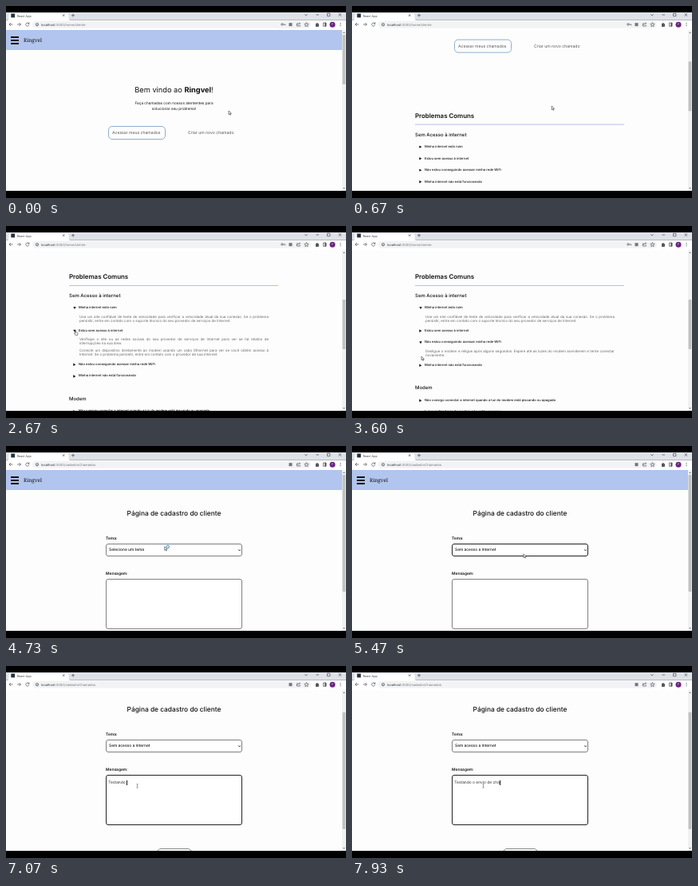
These frames come from a looping animation (426 by 240 pixels, 8000 ms). An HTML page:

```html
<!DOCTYPE html>
<html lang="pt-BR">
<head>
<meta charset="utf-8">
<title>React App</title>
<style>
html, body { margin: 0; width: 100%; height: 100%; overflow: hidden; background: #000; }
#stage { position: relative; width: 426px; height: 240px; overflow: hidden; background: #000;
  font-family: Inter, sans-serif; color: #111; text-rendering: geometricPrecision; white-space: nowrap; }
svg { position: absolute; left: 0; top: 0; width: 426px; height: 240px; }
svg text { dominant-baseline: central; font-size: 4.1px; }
.icon { fill: none; stroke: #55585d; stroke-width: .75; }
#view { position: absolute; top: 30px; width: 421px; height: 201px; overflow: hidden; background: #fdfdfd; }
.page { position: absolute; left: 0; top: -30px; width: 421px; height: 700px; }
.page > * { position: absolute; box-sizing: border-box; }
.bar { top: 30px; width: 421px; height: 25px; background: #b1c5ee; }
.bar i { position: absolute; left: 6px; width: 9.5px; height: 1.7px; background: #111; }
.bar b { position: absolute; left: 22px; top: 12.5px; font: 500 6.4px/0 "Noto Serif", serif; }
.line { line-height: 0; }
.mid { left: 210.5px; transform: translateX(-50%); }
.button { color: #555; font-size: 5.1px; }
.pill { left: 127.5px; top: 150px; width: 72px; height: 17px; border: .7px solid #8eb0cf; border-radius: 5px; }
.rule { left: 79px; top: 255.5px; width: 262px; height: .8px; background: #b9c0e4; }
#faq { left: 79px; top: 262.5px; width: 262px; }
#faq h3 { margin: 0; font-size: 6px; font-weight: 500; line-height: 14px; padding-bottom: .6px; }
.item + h3 { padding-top: 14.7px; }
.item > b { display: block; position: relative; padding-left: 12px; font-size: 4.12px; font-weight: 500; line-height: 14.6px; }
.item > b::before { content: ""; position: absolute; left: 5.3px; top: 5.6px; width: 3.4px; height: 3.6px;
  background: #111; clip-path: polygon(0 0, 90% 50%, 0 100%); }
.item.open > b::before { clip-path: polygon(0 10%, 100% 10%, 50% 95%); }
.body { display: none; margin-left: 13px; width: 237px; padding: 2px 0 1.7px; color: #666; font-size: 4.44px; line-height: 5.15px; }
.open .body { display: block; }
.body p { margin: 0; }
.body p + p { margin-top: 3.3px; }
.body p div:not(:last-child) { text-align-last: justify; }
.label { left: 125px; font-size: 4.9px; font-weight: 600; }
.field { left: 125px; width: 171px; border: .8px solid #808080; border-radius: 3px; background: #fff; }
.field.focus { border: 1.3px solid #222; }
#theme { top: 122px; height: 16px; }
#message { top: 166px; height: 63px; }
#themeText { left: 129px; top: 130px; font-size: 4.85px; font-weight: 500; }
#typed { left: 128.3px; top: 173px; font-size: 4.9px; color: #333; }
#typed.caret::after { content: ""; display: inline-block; width: .6px; height: 5.5px; vertical-align: -1.1px; background: #111; }
.chevron { left: 291px; top: 129px; width: 3.2px; height: 2.4px; background: #222;
  clip-path: polygon(0 0, 50% 60%, 100% 0, 100% 35%, 50% 100%, 0 35%); }
.send { left: 189px; top: 258px; width: 44px; height: 16px; border: .8px solid #888; border-radius: 5px; }
</style>
</head>
<body>
<div id="stage">
  <div id="view">
    <div class="page" id="home">
      <div class="bar"></div>
      <div class="line mid" style="top:106px;font-size:9.25px">Bem vindo ao <b>Ringvel</b>!</div>
      <div class="line mid" style="top:121.5px;font-size:4.67px">Faça chamadas com nossos atententes para</div>
      <div class="line mid" style="top:129px;font-size:4.67px">solucionar seu problema!</div>
      <div class="pill"></div>
      <div class="line button" style="left:133px;top:158.5px">Acessar meus chamados</div>
      <div class="line button" style="left:228px;top:158.5px">Criar um novo chamado</div>
      <div class="line" style="left:79px;top:245px;font-size:7.9px;font-weight:600">Problemas Comuns</div>
      <div class="rule"></div>
      <div id="faq"></div>
    </div>
    <div class="page" id="form">
      <div class="bar"></div>
      <div class="line mid" style="top:85px;font-size:8.35px;font-weight:500">Página de cadastro do cliente</div>
      <div class="line label" style="top:116px">Tema:</div>
      <div class="field" id="theme"></div>
      <div class="line" id="themeText"></div>
      <div class="chevron"></div>
      <div class="line label" style="top:160px">Mensagem:</div>
      <div class="field" id="message"></div>
      <div class="line" id="typed"></div>
      <div class="send"></div>
    </div>
  </div>
  <svg viewBox="0 0 426 240">
    <!-- browser frame -->
    <path fill="#dee2e8" d="M0 8h426v9.5H0z"/>
    <path fill="#fff" d="M0 17.5h426v12.5H0zM2 17.5q1.5 0 1.5-2v-4q0-2 2-2h71q2 0 2 2v4q0 2 1.5 2z"/>
    <rect x="6.3" y="9.6" width="4.8" height="4.8" fill="#263238"/>
    <text x="13.7" y="12" fill="#444" style="font-size:3.7px">React App</text>
    <path class="icon" d="M71 10.5l2.4 2.4m0-2.4l-2.4 2.4M82 11.7h4m-2-2v4M374.3 10.3l1.7 1.8 1.7-1.8M388.5 11h3.5M402.5 9.3h3.4v3.4h-3.4zM416.7 9.3l3.4 3.4m0-3.4l-3.4 3.4"/>
    <path class="icon" d="M8.5 23H4m2-2l-2 2 2 2M14 23h4.5m-2-2l2 2-2 2M28.7 22a2.1 2.1 0 1 0 .2 1.7M29 20.5v1.8h-1.8"/>
    <rect x="33" y="18.7" width="349" height="9" rx="4.5" fill="#f1f3f4"/>
    <g class="icon"><circle cx="39" cy="23.2" r="1.7"/><path d="M39 22.8v1.4"/></g>
    <text x="44" y="23.2" fill="#333">localhost:<tspan id="path" fill="#777"></tspan></text>
    <g class="icon" id="key"><circle cx="346" cy="23" r="1.2"/><path d="M347.2 23h2.6v1.3"/></g>
    <rect x="354.5" y="21.2" width="4" height="4" fill="#72767c"/>
    <path class="icon" d="M366 22h-1.6v3h4v-1.2M365.7 23.5q.3-1.8 2.8-1.8m-1-1l1 1-1 1"/>
    <path class="icon" d="M376.5 20.6l.8 1.7 1.8.2-1.3 1.3.3 1.8-1.6-.9-1.6.9.3-1.8-1.3-1.3 1.8-.2z"/>
    <path fill="#55585d" d="M388 22h1a.9.9 0 0 1 1.8 0h1v1.2a.9.9 0 0 1 0 1.6V26H388z"/>
    <path class="icon" d="M397.5 21h3.6v4.3h-3.6z"/><path fill="#55585d" d="M399.3 21h1.8v4.3h-1.8z"/>
    <circle cx="409" cy="23.2" r="3.5" fill="#6b2382"/>
    <text x="409" y="23.3" fill="#fff" text-anchor="middle" style="font-size:3.5px">F</text>
    <path stroke="#55585d" stroke-dasharray=".9 .8" d="M419 21v4.5"/>
    <!-- scrollbar -->
    <path fill="#f1f1f1" d="M421 30h5v201h-5z"/>
    <path fill="#666" d="M422.2 34l1.3-1.6 1.3 1.6zM422.2 227.2l1.3 1.6 1.3-1.6z"/>
    <rect id="thumb" x="421.6" width="3.8" fill="#c1c1c1"/>
    <!-- pointer -->
    <g id="pointer" stroke-width=".5">
      <path data-shape="arrow busy" fill="#fff" stroke="#111" d="M0 0v4.6l1.1-1 .8 1.7.8-.4-.8-1.6h1.5z"/>
      <circle data-shape="busy" cx="4" cy="0" r="1.7" fill="none" stroke="#2b86d9" stroke-width="1"/>
      <path data-shape="hand" fill="#fff" stroke="#111" d="M-.5 0q.6-.6 1 0v2l2 .5q.6.2.5.9l-.4 2H0L-1.5 3.3q.3-.6 1 0z"/>
      <path data-shape="text" fill="none" stroke="#333" d="M-1-2.3h.7l.3.3.3-.3H1M0-2v4M-1 2.3h.7l.3-.3.3.3H1"/>
    </g>
  </svg>
</div>
<script>
const LOOP = 8000, STEP = 1000 / 15;
const $ = id => document.getElementById(id);

for (const bar of document.querySelectorAll('.bar'))
  bar.innerHTML = [8, 12, 16.3].map(y => `<i style="top:${y}px"></i>`).join('') + '<b>Ringvel</b>';

// Each answer is a list of paragraphs, each paragraph a list of lines.
const sections = {
  'Sem Acesso à internet': [
    ['Minha internet está ruim', [[
      'Use um site confiável de teste de velocidade para verificar a velocidade atual da sua conexão. Se o problema',
      'persistir, entre em contato com o suporte técnico do seu provedor de serviços de Internet.']]],
    ['Estou sem acesso à internet', [[
      'Verifique o site ou as redes sociais do seu provedor de serviços de Internet para ver se há relatos de',
      'interrupções na sua área.'], [
      'Conecte um dispositivo diretamente ao modem usando um cabo Ethernet para ver se você obtém acesso à',
      'Internet. Se o problema persistir, entre em contato com o provedor de sua Internet.']]],
    ['Não estou conseguindo acessar minha rede WiFi', [[
      'Desligue o modem e religue após alguns segundos. Espere até as luzes do modem acenderem e tente conectar',
      'novamente.']]],
    ['Minha internet não está funcionando', []]
  ],
  'Modem': [
    ['Não consigo conectar a internet quando a luz do modem está piscando ou apagada', []],
    ['Luzes indicadoras do modem não estão acessas', []]
  ]
};
const paragraph = lines => `<p>${lines.map(l => `<div>${l}</div>`).join('')}</p>`
  .replace('<p>', '<section>').replace('</p>', '</section>');
const item = ([question, answer]) =>
  `<div class="item"><b>${question}</b><div class="body">${answer.map(paragraph).join('')}</div></div>`;
$('faq').innerHTML = Object.entries(sections)
  .map(([title, items]) => `<h3>${title}</h3>${items.map(item).join('')}`).join('');
const items = [...document.querySelectorAll('.item')];
const shapes = [...document.querySelectorAll('[data-shape]')];

const style = document.createElement('style');
style.textContent = `.body section + section { margin-top: 3.3px; }
  .body section div:not(:last-child) { text-align-last: justify; }`;
document.head.append(style);

const openTimes = [[1150, 4450], [1900, 2850], [3200, 4450]];
const moves = [
  [0, 279, 131], [700, 250, 125], [1100, 87, 102], [1220, 87, 102], [1400, 102, 121],
  [1800, 87, 131], [2850, 87, 131], [3050, 87, 146], [3300, 87, 146], [3600, 87, 163],
  [4100, 200, 160], [4350, 257, 158], [4450, 257, 158], [4730, 190, 121], [5150, 210, 130],
  [5500, 215, 135], [6200, 166.5, 149], [6500, 164.5, 150], [LOOP, 164.5, 150]
];
const pointerShapes = [[0, 'arrow'], [1000, 'hand'], [1300, 'text'], [1700, 'hand'], [3450, 'arrow'],
  [4250, 'hand'], [4450, 'busy'], [4900, 'arrow'], [6000, 'text']];
const message = 'Testando o envio de cham';

const ramp = (t, from, to) => Math.min(1, Math.max(0, (t - from) / (to - from)));
const ease = (t, from, to) => { const p = ramp(t, from, to); return p * p * (3 - 2 * p); };

function pointerAt(t) {
  const i = moves.findIndex(m => m[0] > t);
  const [t0, x0, y0] = moves[i - 1], [t1, x1, y1] = moves[i];
  const p = ease(t, t0, t1);
  return [x0 + (x1 - x0) * p, y0 + (y1 - y0) * p];
}

function draw(t) {
  const onForm = t >= 4450;
  const scroll = onForm ? 30 * ease(t, 5650, 5950)
    : 182 * (ease(t, 300, 950) - ease(t, 3750, 4200));
  const page = $(onForm ? 'form' : 'home');
  $('home').style.display = onForm ? 'none' : '';
  $('form').style.display = onForm ? '' : 'none';
  page.style.transform = `translateY(${-scroll}px)`;

  const height = onForm ? 267 : 630, track = 194;
  $('thumb').setAttribute('y', 36 + scroll / height * track);
  $('thumb').setAttribute('height', 201 / height * track);
  $('path').textContent = '3000/' + (onForm ? 'cadastroChamados' : 'home/cliente');
  $('key').style.display = onForm ? 'none' : '';

  openTimes.forEach(([from, to], i) => items[i].classList.toggle('open', t >= from && t < to));

  const writing = t >= 6450;
  $('themeText').textContent = t < 5450 ? 'Selecione um tema' : 'Sem acesso a Internet';
  $('theme').classList.toggle('focus', t >= 5150 && !writing);
  $('message').classList.toggle('focus', writing);
  $('typed').classList.toggle('caret', writing);
  $('typed').textContent = message.slice(0, Math.round(message.length * ramp(t, 6600, 7900)));

  const [x, y] = pointerAt(t);
  const shape = pointerShapes.filter(s => s[0] <= t).pop()[1];
  $('pointer').setAttribute('transform', `translate(${x} ${y})`);
  for (const s of shapes) s.style.display = s.dataset.shape.includes(shape) ? '' : 'none';
}

const start = performance.now();
function tick() {
  const t = (performance.now() - start) % LOOP;
  draw(Math.floor(t / STEP) * STEP);
  requestAnimationFrame(tick);
}
tick();
</script>
</body>
</html>
```
